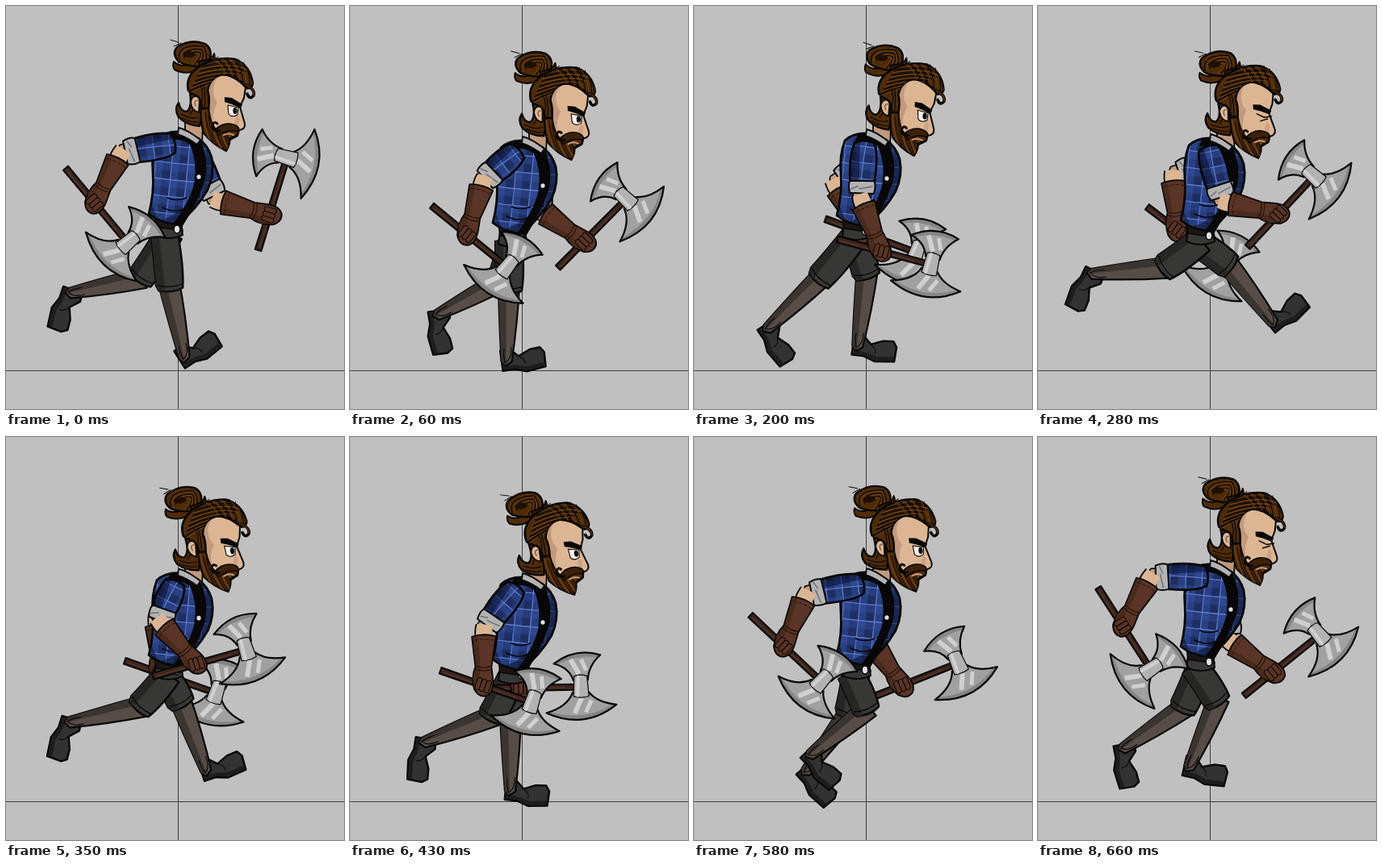
An HTML page with a canvas that plays this animation: 419x500 px, repeating every 730 ms.

```html
<!DOCTYPE html>
<html lang="en">
<head>
<meta charset="utf-8">
<title>Run cycle</title>
<style>
html, body { margin: 0; width: 100%; height: 100%; overflow: hidden; background: #c0c0c0; }
canvas { display: block; }
</style>
</head>
<body>
<canvas id="stage" width="419" height="500"></canvas>
<script>
const ctx = document.getElementById('stage').getContext('2d');
const LOOP = 730;
const STEPS = [0, 60, 120, 200, 280, 350, 430, 510, 580, 660];
const KEYS = [0, 120, 200, 280, 430, 580, 660];

// One value per key time; steps in between are interpolated.
const body = { y: [0, 22, 2, 8, 18, 12, 2], sx: [203, 207, 212, 213, 204, 204, 204] };
const head = {
  x: [272, 275, 272, 272, 277, 274, 274],
  y: [178, 200, 184, 187, 194, 190, 182],
  rot: [0, -5, 2.5, -4, -10, -6, -3]
};
const nearArm = {
  x: [110, 180, 232, 298, 165, 111, 105],
  y: [244, 322, 304, 258, 308, 259, 234],
  fore: [118, 96, 69, 12, 91, 114, 120],
  axe: [50, 28, 15, -47, 19, 43, 57]
};
const farArm = {
  x: [326, 254, 206, 172, 212, 258, 291],
  y: [259, 325, 280, 277, 311, 308, 292],
  fore: [15, 56, 62, 86, 88, 55, 36],
  axe: [-73, -18, 20, 37, -1, -22, -39]
};
const nearLeg = {
  x: [222, 167, 90, 65, 90, 143, 187],
  y: [438, 447, 402, 333, 380, 396, 412],
  shin: [78, 105, 136, 175, 159, 141, 113],
  foot: [-37, 12, 52, 112, 95, 42, 8]
};
const farLeg = {
  x: [78, 136, 203, 293, 199, 138, 104],
  y: [357, 412, 424, 394, 441, 417, 388],
  shin: [168, 135, 97, 52, 90, 126, 146],
  foot: [105, 48, 3, -43, 2, 44, 75]
};

const INK = '#080706', STEEL = '#a1a1a1', SHINE = '#d0d0d0';
const SKIN = '#dcb693', TAN = '#c19a7b', HAIR = '#4f2c06', GLOVE = '#5a3425';
const CLOTH = '#1e2e60', PANTS = '#373736', SHOE = '#323232', CUFF = '#b4b3b3';

const rad = d => d * Math.PI / 180;

function at(track, t) {
  let i = KEYS.length - 2;
  while (i > 0 && KEYS[i] > t) i--;
  const k = (t - KEYS[i]) / (KEYS[i + 1] - KEYS[i]);
  return track[i] + (track[i + 1] - track[i]) * k;
}

function pose(tracks, t) {
  const out = {};
  for (const k in tracks) out[k] = at(tracks[k], t);
  return out;
}

function within(x, y, deg, draw) {
  ctx.save();
  ctx.translate(x, y);
  ctx.rotate(rad(deg));
  draw();
  ctx.restore();
}

function fill(d, color) {
  ctx.fillStyle = color;
  ctx.fill(new Path2D(d));
}

function line(d, color = INK, w = 1) {
  ctx.strokeStyle = color;
  ctx.lineWidth = w;
  ctx.stroke(new Path2D(d));
}

function shape(d, color, w = 2.4) {
  fill(d, color);
  line(d, INK, w);
}

function clipped(d, draw) {
  ctx.save();
  ctx.clip(new Path2D(d));
  draw();
  ctx.restore();
}

function oval(x, y, rx, ry, color, w = 0) {
  ctx.beginPath();
  ctx.ellipse(x, y, rx, ry, 0, 0, 7);
  ctx.fillStyle = color;
  ctx.fill();
  if (w) {
    ctx.strokeStyle = INK;
    ctx.lineWidth = w;
    ctx.stroke();
  }
}

function plaid(d, x, y, w, h, tilt, shade) {
  fill(d, CLOTH);
  clipped(d, () => {
    within(x, y, tilt, () => {
      for (let i = -10; i < w; i += 20) {
        line(`M${i + 6} -20V${h}`, 'rgba(56,88,172,.42)', 9);
        line(`M${i} -20Q${i + 3} ${h / 2} ${i} ${h}`, '#5f7bd2', 1.3);
      }
      for (let j = -10; j < h; j += 21) {
        line(`M-20 ${j + 7}H${w}`, 'rgba(56,88,172,.36)', 9);
        line(`M-20 ${j}Q${w / 2} ${j + 4} ${w} ${j - 2}`, '#5f7bd2', 1.3);
      }
    });
    fill(shade, 'rgba(6,10,34,.5)');
  });
  line(d, INK, 2.8);
}

function drawAxe(hand, deg, grip) {
  within(hand.x, hand.y, deg, () => {
    shape(`M${-grip} -4L${116 - grip} -3V4L${-grip} 4Z`, '#3c251e', 2);
    line(`M${4 - grip} 1H${100 - grip}`, '#5d3d31', 1);
    ctx.translate(120 - grip, 0);
    const small = 'M9 -8Q10 -26 25 -39Q-6 -49 -33 -29Q-14 -24 -9 -8Z';
    const large = 'M10 7Q20 20 44 23Q4 54 -43 32Q-17 25 -10 7Z';
    for (const d of [small, large]) {
      fill(d, STEEL);
      clipped(d, () => {
        line('M26 -38Q-6 -45 -34 -28M44 23Q4 49 -43 32', '#858585', 6);
        ctx.lineCap = 'butt';
        line('M-12 -34L-2 -16M-8 33L1 14', SHINE, 6);
        line('M1 -34L7 -20M6 32L13 17', SHINE, 5);
        ctx.lineCap = 'round';
      });
      line(d, INK, 2.2);
    }
    shape('M-8 -13Q0 -16 8 -13L10 12Q0 15 -9 12Z', '#b2b2b2', 1.2);
    line('M-3 -12L-4 11', SHINE, 4);
  });
}

function drawArm(arm, shoulder, grip, reach) {
  const a = rad(arm.fore);
  const ex = arm.x - reach * Math.cos(a), ey = arm.y - reach * Math.sin(a);
  const dx = ex - shoulder.x, dy = ey - shoulder.y;
  const d = Math.hypot(dx, dy), s = d * .68;
  drawAxe(arm, arm.axe, grip);
  within(shoulder.x, shoulder.y, Math.atan2(dy, dx) * 180 / Math.PI, () => {
    shape(`M${s} -10L${d} -10Q${d + 9} 0 ${d} 10L${s} 11Z`, SKIN, 1.8);
    fill(`M${s} 3L${d} 2L${d} 9L${s} 10Z`, TAN);
    plaid(`M-5 -11Q8 -18 ${s} -15L${s + 2} 15Q14 19 -4 13Q-9 0 -5 -11Z`,
      -10, -14, 80, 50, 4, `M-12 7L${s} 4V20H-12Z`);
    shape(`M${s - 2} -15Q${s + 6} -18 ${s + 14} -15L${s + 15} 14Q${s + 5} 18 ${s} 15Z`, CUFF, 2);
    line(`M${s + 5} -13L${s + 9} 3M${s + 10} 13L${s + 6} 5`, '#6f6e70', 1.5);
  });
  within(ex, ey, arm.fore, () => {
    fill('M-5 -10Q7 -11 15 -10V10Q4 12 -6 8Z', SKIN);
    line('M-5 10Q5 12 15 10', INK, 1.8);
    shape('M9 -15Q5 0 10 15L47 10Q60 15 75 11Q86 5 83 -5Q78 -14 62 -12L47 -10Z', GLOVE, 1.8);
    fill('M10 7L47 4L70 5L79 8L62 13L47 9L10 14Z', '#4a2a1c');
    line('M46 -10Q50 0 46 10M50 -10Q54 0 50 10', '#25130c', 1.2);
    ctx.setLineDash([4, 3]);
    line('M14 -13Q11 0 15 13', '#2c170f', 1);
    ctx.setLineDash([]);
  });
  within(arm.x, arm.y, arm.axe, () => {
    for (let i = -9; i <= 7; i += 6) shape(`M${i} -6Q${i + 4} -10 ${i + 6} -6L${i + 6} 6Q${i + 3} 10 ${i} 6Z`, GLOVE, 1);
  });
}

function drawLeg(leg, hip) {
  const a = rad(leg.shin);
  const kx = leg.x - 91 * Math.cos(a), ky = leg.y - 91 * Math.sin(a);
  within(leg.x, leg.y, leg.foot, () => {
    shape('M-5 -16L-7 9L8 10L22 16L46 15L48 -3L44 -10L31 -10L16 -5L6 -16Z', SHOE);
    fill('M-4 3L10 5L24 10L46 9L45 14L24 15L9 9L-5 8Z', '#1d1d1d');
    line('M17 -4Q23 0 22 6', INK, 1);
  });
  within(kx, ky, leg.shin, () => {
    const d = 'M-5 -13Q40 -12 90 -6L95 2L89 7Q40 11 -4 13Z';
    shape(d, '#574d46', 2.2);
    clipped(d, () => fill('M-5 3L94 1V9L-4 15Z', '#3b3531'));
    line('M72 -5Q86 -6 91 2Q84 5 74 4', INK, 1.1);
  });
  const dx = kx - hip.x, dy = ky - hip.y, d = Math.hypot(dx, dy);
  within(hip.x, hip.y, Math.atan2(dy, dx) * 180 / Math.PI, () => {
    const p = `M-8 -16Q${d * .6} -20 ${d + 2} -16Q${d + 8} -4 ${d + 3} 14L${d - 4} 17Q${d / 2} 16 -6 17Z`;
    shape(p, PANTS);
    clipped(p, () => fill(`M-8 7L${d + 8} 6V20H-8Z`, '#262625'));
    line(`M${d - 3} -16Q${d + 2} 0 ${d - 4} 15`, INK, 1.2);
  });
}

function drawTorso() {
  shape('M187 260L217 268L219 284Q202 292 184 284Z', PANTS, 2);
  shape('M184 260L217 268L219 279L186 274Z', '#1b1513', 1.5);
  shape('M222 140L244 148L243 170L222 162Z', TAN, 1.8);
  plaid('M216 156Q197 155 187 165Q180 184 182 205Q184 232 177 258Q192 270 213 271Q236 252 250 228Q259 208 255 188Q250 172 238 164Z',
    178, 158, 110, 130, 6, 'M246 165L262 180L260 215L214 274L190 266Q220 258 236 230Q248 205 246 165ZM177 240L188 262L176 262Z');
  fill('M203 157Q230 154 243 171Q252 196 246 218Q236 246 219 273L207 271Q226 246 233 222Q238 196 228 172Q218 164 200 166Z', INK);
  line('M200 238Q212 243 224 238M194 250Q208 257 220 252', INK, 1.4);
  oval(239, 212, 2.6, 2.8, '#dedede');
  shape('M214 151Q224 153 241 166L237 172Q225 163 213 159Z', CUFF, 1.8);
  oval(212, 277, 3.8, 5, '#e2e2e2', 1.5);
}

function drawBun() {
  shape('M238 76Q222 89 204 80Q201 76 203 70Q212 79 230 71Z', HAIR, 2);
  shape('M240 69Q250 69 253 60Q256 71 246 77Z', HAIR, 2);
  const bun = 'M240 76Q222 77 209 70Q200 60 207 52Q224 41 242 48Q251 54 248 67Z';
  shape(bun, HAIR, 2.4);
  clipped(bun, () => {
    for (let i = 0; i < 6; i++)
      line(`M${210 + i * 3} ${68 - i}Q${205 + i * 5} ${48 + i * 2} ${240 - i} ${51 + i * 2}Q${246 - i * 2} 64 ${241 - i * 3} 73`, i % 2 ? '#6b3d0e' : INK, 1.2);
    oval(222, 61, 8, 4, '#1d0f04');
  });
  shape('M234 70L247 67L247 80L234 82Z', '#351b05', 2);
  line('M199 43L209 46M212 47L203 51M250 69L258 64', INK, 1);
}

function drawHead(shut) {
  within(5, -1, 0, drawBun);
  line('M262 72Q256 75 253 82M285 75L288 66M291 78L295 70', INK, 1);
  shape('M242 108Q245 130 240 149Q224 148 214 138Q208 128 214 120Q216 131 224 131Q231 126 228 108Z', HAIR);
  line('M217 134Q230 141 239 138M219 139Q230 145 238 144M233 112Q236 126 228 134', INK, 1.2);
  const face = 'M248 90Q274 76 297 101L295 114L290 125L296 146Q297 153 289 154L287 161L266 172L246 152Z';
  shape(face, SKIN, 2);
  clipped(face, () => {
    fill('M246 86L266 84Q254 96 258 112L262 120Q255 132 257 150L246 155Z', TAN);
    fill('M286 136L290 140L288 150L282 149Z', '#cda284');
  });
  shape('M240 113Q231 109 229 119Q230 130 239 132Z', SKIN, 1.8);
  line('M238 117Q232 117 235 124', '#6d4a36', 1.2);
  if (shut) {
    line('M275 125L284 130L293 129M279 134L288 132', INK, 1.5);
  } else {
    shape('M275 123L288 126L287 135Q280 139 276 134Z', '#f2f2f0', 1.1);
    oval(284, 130, 2.6, 4, INK);
  }
  fill('M271 113L280 114L293 122L291 127L280 122L271 119Z', INK);

  const beard = 'M242 118Q240 142 245 158Q256 172 273 180Q279 170 277 164L286 161Q291 155 282 148Q268 145 260 153Q251 143 251 118Z';
  shape(beard, HAIR, 2);
  clipped(beard, () => {
    for (let i = 0; i < 10; i++)
      line(`M${244 + i * 3.4} ${130 + i * 2.6}Q${246 + i * 3.4} 160 ${260 + i * 2.6} 178`, i % 3 ? '#1a0d04' : '#75441a', 1.2);
  });
  line('M270 160Q276 157 282 160', '#c59a7e', 2);
  shape('M259 154Q269 143 282 147Q291 150 288 156Q276 152 264 160Z', '#3d2106', 1.5);
  line('M265 155Q255 156 256 148Q258 142 262 146', INK, 3);

  const hair = 'M226 105Q222 88 238 76Q258 62 284 66Q303 74 306 96Q305 103 298 102Q288 86 270 85Q253 87 250 105Q253 114 251 127L243 127Q241 111 234 111Z';
  shape(hair, HAIR, 2.6);
  clipped(hair, () => {
    for (let i = 0; i < 18; i++)
      line(`M${227 + i} ${108 - i * 2}Q${246 + i * 2.4} ${97 - i * 1.9} ${270 + i * 2} ${92 - i * .8}`, i % 3 ? INK : '#7a4812', 1.1);
    for (let i = 0; i < 9; i++)
      line(`M${258 + i * 5} 66Q${274 + i * 4} 78 ${274 + i * 4} 98`, i % 2 ? INK : '#6b3d0e', 1.1);
    line('M245 98Q248 110 246 126M241 98Q245 106 243 118', INK, 1.2);
  });
  line('M297 98Q309 103 307 111Q302 117 299 109', INK, 3.6);
  line('M297 98Q309 103 307 111', HAIR, 1.6);
}

function draw(step) {
  const t = STEPS[step];
  const b = pose(body, t), h = pose(head, t);
  const near = pose(nearArm, t), far = pose(farArm, t);
  const hip = { x: 197, y: 287 + b.y };
  const farSide = () => drawArm(far, { x: 234, y: 182 + b.y }, 46, 68);
  const farOnTop = step === 3 || step === 6;

  ctx.fillStyle = '#c0c0c0';
  ctx.fillRect(0, 0, 419, 500);
  ctx.fillStyle = '#3e3e3e';
  ctx.fillRect(213, 0, 1, 500);
  ctx.fillRect(0, 452, 419, 1);

  if (!farOnTop) farSide();
  drawLeg(pose(farLeg, t), { x: hip.x + 3, y: hip.y });
  drawLeg(pose(nearLeg, t), hip);
  if (farOnTop) farSide();
  within(0, b.y, 0, drawTorso);
  within(h.x, h.y, h.rot, () => {
    ctx.translate(-272, -178);
    drawHead(step === 4 || step === 9);
  });
  drawArm(near, { x: b.sx, y: 172 + b.y }, 56, 70);
}

ctx.lineJoin = ctx.lineCap = 'round';
const start = performance.now();
let shown = -1;

function tick() {
  const t = (performance.now() - start) % LOOP;
  let step = STEPS.length - 1;
  while (STEPS[step] > t) step--;
  if (step !== shown) draw(shown = step);
  requestAnimationFrame(tick);
}
tick();
</script>
</body>
</html>
```
